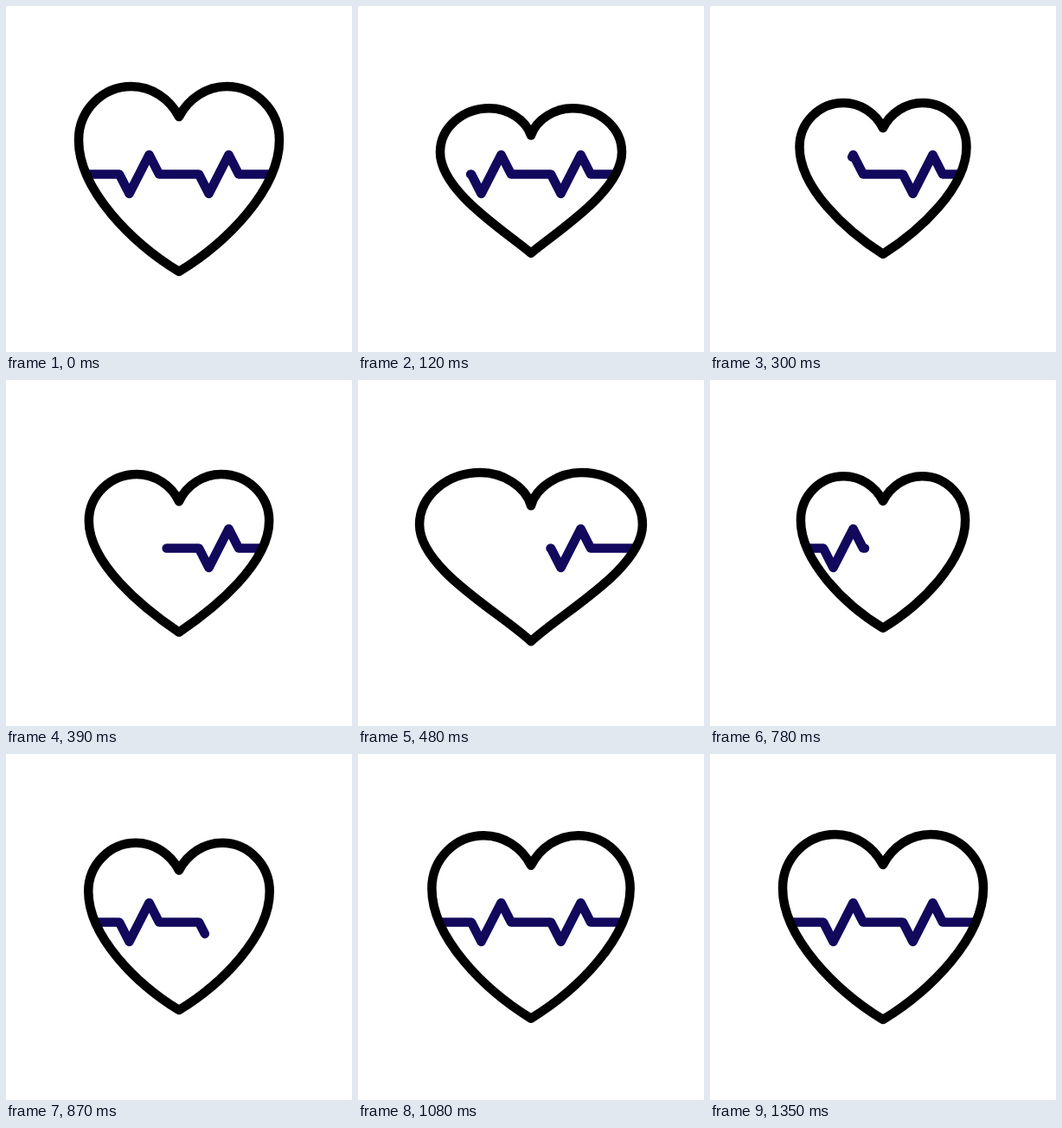
These frames come from a looping animation (400 by 400 pixels, 3710 ms). An HTML page with a canvas:

```html
<!DOCTYPE html>
<html lang="en">
<head>
<meta charset="utf-8">
<title>Heartbeat</title>
<style>
  html, body { margin: 0; width: 100%; height: 100%; overflow: hidden; background: #fff; }
  canvas { display: block; width: 100vmin; height: 100vmin; }
</style>
</head>
<body>
<canvas id="stage"></canvas>
<script>
const LOOP = 3710, STEP = 30, SIZE = 400;
const CX = 200, CY = 194.5, WIDTH = 10.5;
const INK = '#000', PULSE = '#12085c';
const BEAT = 500 / 3, REST_AT = 1335;
const SCALES = [1, 0.803, 0.826, 1.01, 0.655];   // heart size at each beat
const ARC = 0.5523;                              // quarter-ellipse handle length

const canvas = document.getElementById('stage');
const ctx = canvas.getContext('2d');
const ratio = Math.max(1, window.devicePixelRatio || 1);
canvas.width = canvas.height = SIZE * ratio;

const lerp = (a, b, p) => a + (b - a) * p;
const ramp = (t, from, to) => Math.min(1, Math.max(0, (t - from) / (to - from)));
const wave = p => Math.sin(p * Math.PI / 2) ** 2;
const easeOut = p => 1 - Math.pow(1 - p, 3.5);

// Flat line with two identical zigzags, mirrored about the centre.
function makePulse() {
  const half = 119, period = 92, zig = 46, peak = 22.5;
  const points = [[CX - half, CY]];
  for (const x of [CX - (period + zig) / 2, CX + (period - zig) / 2]) {
    points.push([x, CY], [x + zig / 4, CY + peak], [x + zig * 3 / 4, CY - peak], [x + zig, CY]);
  }
  points.push([CX + half, CY]);
  const path = new Path2D();
  let length = 0;
  points.forEach(([x, y], i) => {
    path.lineTo(x, y);
    if (i) length += Math.hypot(x - points[i - 1][0], y - points[i - 1][1]);
  });
  return { path, length };
}
const pulse = makePulse();

function beatAt(t) {
  const i = Math.floor(t / BEAT), last = SCALES.length - 1;
  if (i >= last) {
    return { scale: lerp(SCALES[last], 1, easeOut(ramp(t, last * BEAT, REST_AT))), squash: 0 };
  }
  return {
    scale: lerp(SCALES[i], SCALES[i + 1], wave(t / BEAT - i)),
    squash: wave(t / BEAT) * (0.82 + 0.36 * t / 1000)
  };
}

// Squash widens and flattens the heart; all lengths are relative to its centre.
function heartPath({ scale, squash: q }) {
  const side = 116 + 13 * q, sideY = -39.5 + 13 * q;
  const lobe = 55 + 3 * q, topY = -101.5 + 15 * q;
  const notchY = -66.5 + 18.3 * q, lean = 11 - 5 * q;
  const tipY = 112.5 - 5.4 * q, flare = 54 - 20 * q;

  const path = new Path2D();
  for (const dir of [-1, 1]) {
    const at = (x, y) => [CX + dir * x * scale, CY + y * scale];
    path.moveTo(...at(0, notchY));
    path.bezierCurveTo(...at(lean, lerp(notchY, topY, 0.6)), ...at(lobe * 0.58, topY), ...at(lobe, topY));
    path.bezierCurveTo(...at(lerp(lobe, side, ARC), topY), ...at(side, lerp(sideY, topY, ARC)), ...at(side, sideY));
    path.bezierCurveTo(...at(side, lerp(sideY, tipY, 0.38)), ...at(flare, tipY - 33), ...at(0, tipY));
  }
  return path;
}

function drawPulse(from, to) {
  if (to - from < 0.001) return;
  ctx.setLineDash([(to - from) * pulse.length, pulse.length * 2]);
  ctx.lineDashOffset = -from * pulse.length;
  ctx.stroke(pulse.path);
}

function draw(t) {
  ctx.setTransform(ratio, 0, 0, ratio, 0, 0);
  ctx.fillStyle = '#fff';
  ctx.fillRect(0, 0, SIZE, SIZE);
  ctx.lineWidth = WIDTH;
  ctx.lineCap = ctx.lineJoin = 'round';

  const heart = heartPath(beatAt(t));
  ctx.save();
  ctx.clip(heart);
  ctx.strokeStyle = PULSE;
  drawPulse(ramp(t, 0, 850), 1);
  drawPulse(0, ramp(t, 547, 1077));
  ctx.restore();

  ctx.strokeStyle = INK;
  ctx.stroke(heart);
}

const start = performance.now();
function tick() {
  const t = (performance.now() - start) % LOOP;
  draw(Math.floor(t / STEP) * STEP);
  requestAnimationFrame(tick);
}
tick();
</script>
</body>
</html>
```
